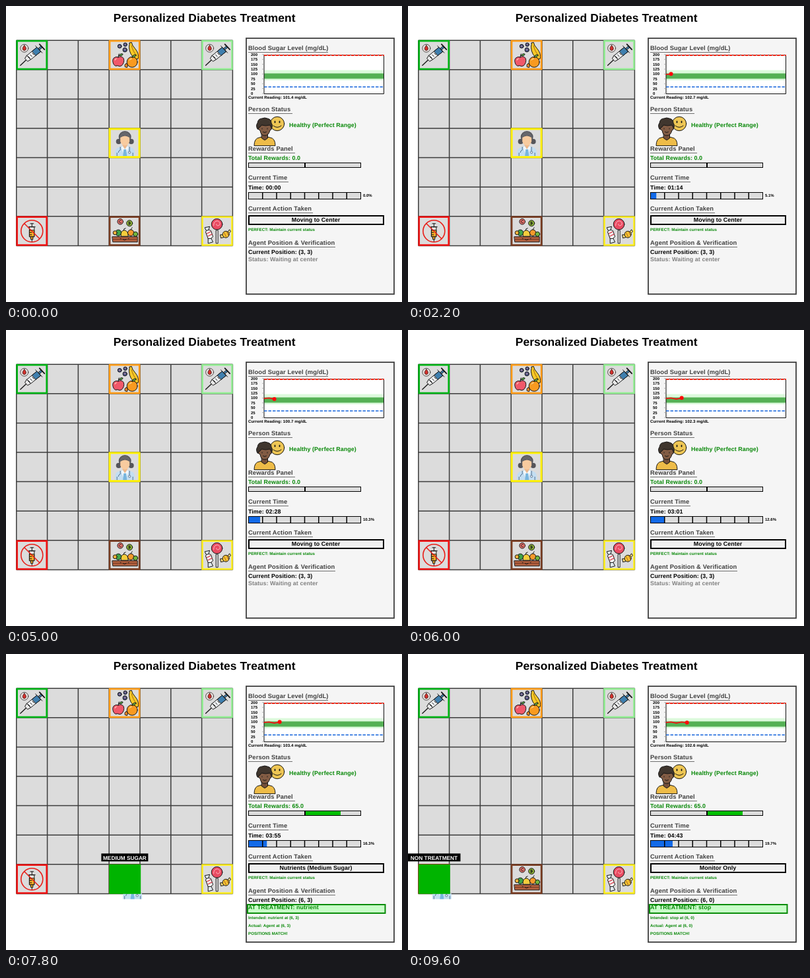
An HTML page that plays this animation: 600 px wide and 450 px high, repeating every 9800 ms.

```html
<!DOCTYPE html>
<html lang="en">
<head>
<meta charset="utf-8">
<title>Personalized Diabetes Treatment</title>
<style>
html, body { margin: 0; width: 100%; height: 100%; overflow: hidden; background: #fff; }
svg { display: block; width: 600px; height: 450px; }
text { font: bold 8.9px "Liberation Sans", Arial, sans-serif; letter-spacing: .07px; white-space: pre; text-rendering: geometricPrecision; }
.title { font-size: 17.4px; letter-spacing: .11px; }
.head { font-size: 9.3px; letter-spacing: .13px; fill: #404040; }
.small { font-size: 6.2px; letter-spacing: .03px; }
.tick { font-size: 6px; letter-spacing: 0; }
.mid { text-anchor: middle; }
.good { fill: #088808; }
.move { fill: #0a64e6; }
.ink { stroke: #161616; stroke-width: 1; stroke-linejoin: round; stroke-linecap: round; }
.none { fill: none; }
</style>
</head>
<body>
<svg viewBox="0 0 600 450">
  <defs>
    <g id="syringe" class="ink">
      <path class="none" d="M6 38L15 29.500" stroke-width="1.300"/>
      <path fill="#e8e8e8" d="M13 28l4 4 5-3-6-6z"/>
      <path fill="#f2f4f6" d="M16 23L31 10.500l6 6.500-15 12z"/>
      <path fill="#3f7fae" d="M24 16.500l7-6 6 6.500-7.500 6z"/>
      <path class="none" d="M18 24.500l2.500 2.500M21 22l2.500 2.500M24 19.500l2.500 2.500M29 8.500l10 10.500"/>
      <path fill="#3f7fae" d="M33.500 12l4-3.500 2 2-4 3.500z"/>
      <path class="none" d="M35 6l7.500 8" stroke-width="1.800"/>
      <circle cx="12" cy="12" r="6" fill="#eadfdd" stroke-width=".7"/>
      <path fill="#d5302c" stroke-width=".7" d="M12 7.500q4 4.500 2 7-2 2-4 0-2-2.500 2-7z"/>
    </g>
    <g id="fruit" class="ink">
      <path fill="#f7c927" d="M31 4l3-1q1 5 5 9 7 8 5 16-3 2-7-2Q28 17 31 4z"/>
      <path class="none" stroke="#a66a10" d="M34 8q2 9 8 16"/>
      <g fill="#51598b"><circle cx="16" cy="9" r="2.900"/><circle cx="24.500" cy="6.500" r="2.700"/><circle cx="24" cy="14.500" r="3.200"/></g>
      <path fill="none" stroke="#d99a9a" stroke-width=".9" d="M15 9h2M24 6h1M23 14h2"/>
      <path fill="#f0586a" d="M14 25.500q5-2.500 8 2 2 6-3 11-3 2-6 0-4 2-6-2-3-6 0-9.500 3-3 7-1.500z"/>
      <path class="none" d="M14 25.500q0-4 1-5"/>
      <path fill="#55ad43" d="M15 23q3-4 6-2-2 4-6 2z"/>
      <circle cx="35" cy="33" r="8" fill="#f99a20"/>
      <path fill="#6db43d" d="M35 26q1-5 6-4-1 4-6 4z"/>
      <path class="none" stroke="#fff0d0" d="M31 30q1-2 3-2M9 30q0-2 2-2"/>
      <path fill="#f48c2a" d="M24 40q-1-4 2.500-5 3 3 1 6z"/>
    </g>
    <g id="basket" class="ink">
      <circle cx="17" cy="8" r="4.300" fill="#ef7770"/><circle cx="31" cy="10.500" r="4.500" fill="#8fb43a"/>
      <path class="none" d="M18.500 6.500q-3-1.500-3.200 1.500.2 3 3.200 1.500M30 8.500v4M30 8.500q4 0 1 2 4 0-1 2"/>
      <circle cx="14" cy="25" r="4.600" fill="#3fa34a"/><circle cx="9" cy="25" r="3" fill="#f3b43b"/>
      <path fill="#f5cd3c" d="M18 30q-1-8 5-9 6 1 6 9z"/>
      <circle cx="33" cy="25" r="4.700" fill="#f59a2c"/><circle cx="40" cy="27" r="3.500" fill="#73b73e"/>
      <path class="none" d="M22 21q0-3 3-3M33 20l2-3"/>
      <path fill="#b4613f" d="M5 31h38v8H6z"/>
      <path class="none" stroke="#6b321f" d="M6 35h36"/>
      <path class="none" d="M21 35q2 2.500 5 0M17 34h1M29 34h1"/>
    </g>
    <g id="sweets" class="ink">
      <path fill="#f4f4f4" d="M22 21h2.500v20H22z"/>
      <circle cx="23" cy="12" r="8.300" fill="#e94b62"/>
      <path class="none" stroke="#ffb8c0" d="M18 14q0-7 6-7 5 2 3 6-4 3-5-1"/>
      <path fill="#dfe8ee" d="M5 17l7-1.500-2 6h-3z"/>
      <path fill="#dfe8ee" d="M10 33h4l3 6-7 2z"/>
      <path fill="#f4f4f4" d="M6 23q4-4 8-1l3 9q-3 4-7 3z"/>
      <path class="none" stroke="#d84856" stroke-width="1.500" d="M8 26l5-2.500M9.500 30l6-3"/>
      <path fill="#f7dc80" d="M32 28l-4 0 1 5 4-1zM40 23l2-3 2 3-3 3z"/>
      <circle cx="36.500" cy="27.500" r="5" fill="#f8c630"/>
      <path class="none" stroke="#a85a28" d="M34 25l3 6M38 23.500l2 5"/>
    </g>
    <g id="ban">
      <g class="ink" stroke-width=".9">
        <path fill="#f4f0e8" d="M20 16h7v15h-7z"/>
        <path fill="#f4ad28" d="M20 21h7v10h-7z"/>
        <path fill="#f4ad28" d="M22 31h3v4h-3z"/>
        <path class="none" d="M23.500 35v4M23.500 16v-5M21 11h5M18.500 16h10M20 21h3M20 24.500h3M20 28h3"/>
      </g>
      <circle cx="23.500" cy="22.500" r="16.500" fill="none" stroke="#e8201a" stroke-width="1.600"/>
      <path d="M12 11l23.500 23.500" stroke="#e8201a" stroke-width="1.600"/>
    </g>
    <g id="doctor">
      <circle cx="14.500" cy="20" r="4" fill="#55555a"/><circle cx="33.500" cy="20" r="4" fill="#55555a"/>
      <ellipse cx="24" cy="13" rx="9.500" ry="9" fill="#55555a"/>
      <path fill="#efb98c" d="M20.500 22h7v7l-3.500 3-3.500-3z"/>
      <path fill="#f8cb9f" d="M17 14q7-5 14 0v6q-2 6-7 6t-7-6z"/>
      <path fill="#66666b" d="M16 15q0-9 8-10 8 1 8 10-3-4-8-4t-8 4z"/>
      <path fill="#c3def2" d="M9 42q-1-11 5-13l7-2 3 5 3-5 7 2q6 2 5 13z"/>
      <path fill="#f4f8fb" d="M20.500 27l3.500 5 3.500-5 2 2-3.500 10h-4l-3.500-10z"/>
      <path fill="#79b6de" d="M22 32h4l1 10h-6z"/>
      <path fill="none" stroke="#56718e" d="M17 28v5q-3 1-3 4M31 28v7M12 42v-5M36 42v-5"/>
      <circle cx="31" cy="36.500" r="1.600" fill="#fff" stroke="#56718e"/>
    </g>
    <clipPath id="below"><path d="M21 44.500h29v8.500H21z"/></clipPath>
  </defs>
  <rect width="600" height="450" fill="#fff"/>
  <text class="title mid" x="300.700" y="24">Personalized Diabetes Treatment</text>
  <g id="board"></g>
  <g id="agent">
    <use href="#doctor"/>
    <rect x=".9" y=".9" width="45" height="42.800" fill="none" stroke="#fff200" stroke-width="3"/>
  </g>
  <g id="treat">
    <g clip-path="url(#below)"><rect x="21" y="44" width="29" height="9" fill="#e8edf2"/><use href="#doctor" x="11.500" y="11"/></g>
    <rect width="48" height="45" fill="#00b400"/>
    <rect id="tagBox" y="-16.500" height="12" fill="#000"/>
    <text id="tag" class="mid" x="23.700" y="-7.300" fill="#fff" style="font-size:8.3px;letter-spacing:0"></text>
  </g>
  <rect x="364" y="49" width="224" height="389" fill="#f5f5f5" stroke="#404040" stroke-width="1.800"/>
  <g id="heads"></g>
  <g id="chart">
    <rect x="391" y="74.500" width="182" height="59" fill="#fff"/>
    <rect x="391" y="97.500" width="182" height="15.500" fill="#dcfadc"/>
    <rect x="391" y="102.500" width="182" height="8" fill="#55b055"/>
    <path d="M391 74v59.500h181.500V74" fill="none" stroke="#111"/>
    <path d="M391 74.500h182" stroke="#502020"/>
    <path d="M391 75h182" stroke="#f02818" stroke-width="2" stroke-dasharray="4.500 1.500"/>
    <path d="M391 123h182" stroke="#1464dc" stroke-width="1.700" stroke-dasharray="4.500 2"/>
    <polyline id="trace" fill="none" stroke="#f01414" stroke-width="1.800"/>
    <circle id="dot" r="3" fill="#ff0a0a"/>
  </g>
  <text id="reading" class="small" x="367" y="141"></text>
  <g class="ink">
    <circle cx="411" cy="179" r="10.700" fill="#eec654"/>
    <path class="none" d="M405 182q6 5 12 0"/>
    <path class="none" stroke-width="1.800" d="M407.500 175.500v1.500M414.500 175.500v1.500"/>
    <path fill="#eebc48" d="M376 212q0-11 8-12l8-2 8 2q8 1 8 12z"/>
    <path fill="#75503a" d="M387.500 194h9v7l-4.500 3-4.500-3z"/>
    <path fill="#40362e" d="M381 187q-3-5 0-9 1-7 7-7 4-2 8 0 6 1 6 7 3 4 0 9z"/>
    <path fill="#825c44" d="M383 185q3-1 4-4 6 2 13 0l2 4q1 3-2 4-2 8-8 8t-7-8q-4-1-2-4z"/>
    <path class="none" d="M389.500 191.500q2.500 2 5 0M388 186v1M396 186v1"/>
  </g>
  <text class="good" x="429" y="183.500">Healthy (Perfect Range)</text>
  <text id="reward" class="good" x="367" y="234"></text>
  <rect x="367.500" y="238.500" width="170" height="7" fill="#dcdcdc"/>
  <rect id="gain" x="453" y="238.500" width="54" height="7" fill="#00be00"/>
  <rect x="367.500" y="238.500" width="170" height="7" fill="none" stroke="#000"/>
  <path d="M453 238v8" stroke="#000" stroke-width="2"/>
  <text id="clock" x="367" y="278.500"></text>
  <rect x="367.500" y="283.500" width="170" height="10" fill="#dcdcdc"/>
  <rect id="day" x="367.500" y="283.500" height="10" fill="#126ae8"/>
  <rect x="367.500" y="283.500" width="170" height="10" fill="none" stroke="#000"/>
  <g id="marks" stroke="#000" stroke-width="1.500"></g>
  <text id="share" class="tick" x="541" y="290"></text>
  <rect x="368" y="319" width="204" height="13" fill="#f0f0f0" stroke="#000" stroke-width="2"/>
  <text id="action" class="mid" x="469.500" y="328.300"></text>
  <text class="small good" x="367" y="342">PERFECT: Maintain current status</text>
  <text id="place" x="367" y="377"></text>
  <rect id="arrived" x="366" y="381" width="208.500" height="13" fill="#c8ffc8" stroke="#0a8c0a" stroke-width="2"/>
  <text id="status" x="367" y="388.300"></text>
  <g id="notes"></g>
</svg>
<script>
const $ = id => document.getElementById(id);
const NS = 'http://www.w3.org/2000/svg';
const STEP = 200, LOOP = 9800, MOVE_START = 31, CELL_STEPS = 3;
const CELL_W = 46.8, CELL_H = 44.6, LEFT = 15.8, TOP = 52.2;

function add(parent, tag, attrs, text = '') {
  const el = document.createElementNS(NS, tag);
  for (const key in attrs) el.setAttribute(key, attrs[key]);
  el.textContent = text;
  return $(parent).appendChild(el);
}
const at = (row, col) => `translate(${LEFT + col * CELL_W} ${TOP + row * CELL_H})`;
const show = (id, on) => $(id).setAttribute('visibility', on ? 'visible' : 'hidden');
const write = (id, text) => { $(id).textContent = text; };

// Board
add('board', 'rect', { x: LEFT, y: TOP, width: CELL_W * 7, height: CELL_H * 7, fill: '#dcdcdc' });
for (let n = 0; n < 8; n++) {
  const x = LEFT + n * CELL_W, y = TOP + n * CELL_H;
  add('board', 'path', { d: `M${x} ${TOP}v${CELL_H * 7}M${LEFT} ${y}h${CELL_W * 7}`, stroke: '#3c3c3c', 'stroke-width': 1.5 });
}
for (const [icon, row, col, color] of [
  ['syringe', 0, 0, '#00b414'], ['fruit', 0, 3, '#ff9c14'], ['syringe', 0, 6, '#90ee90'],
  ['ban', 6, 0, '#f01414'], ['basket', 6, 3, '#7a3d22'], ['sweets', 6, 6, '#fff01e']
]) {
  add('board', 'use', { href: '#' + icon, transform: at(row, col) });
  add('board', 'rect', { x: .9, y: .9, width: 45, height: 42.8, fill: 'none', stroke: color, 'stroke-width': 2.6, transform: at(row, col) });
}

// Panel
for (const [label, y, width] of [
  ['Blood Sugar Level (mg/dL)', 67, 121], ['Person Status', 160, 67], ['Rewards Panel', 220, 71],
  ['Current Time', 264, 61], ['Current Action Taken', 311, 98], ['Agent Position & Verification', 363, 132]
]) {
  add('heads', 'text', { class: 'head', x: 367, y }, label);
  add('heads', 'path', { d: `M367 ${y + 3.5}h${width}`, stroke: '#707070' });
}
for (let n = 0; n <= 8; n++) {
  const y = 133 - n * 7.4;
  add('chart', 'text', { class: 'tick', x: 371, y: y + 2 }, n * 25);
  add('chart', 'path', { d: `M388 ${y}h3`, stroke: '#999', 'stroke-width': .7 });
}
for (let n = 1; n < 8; n++) add('marks', 'path', { d: `M${367.5 + n * 21.25} 283.500v10` });
const notes = [400, 412, 427].map(y => add('notes', 'text', { class: 'small', x: 367, y }));

// [step, minutes, reading]
const LOG = [[0, 0, 101.4], [11, 74.1, 102.7], [25, 148.2, 100.7], [34, 208.4, 102.7],
  [39, 235.2, 103.4], [45, 267.5, 100.5], [48, 283.4, 102.6]];
const TRACE = [104.2, 103.3, 105, 103.3, 104.3];
const PATH = [[3, 3], [4, 3], [5, 3], [6, 3], [6, 2], [6, 1], [6, 0]];
const STOPS = {
  3: { name: 'nutrient', tag: 'MEDIUM SUGAR', width: 71, action: 'Nutrients (Medium Sugar)' },
  6: { name: 'stop', tag: 'NON TREATMENT', width: 80, action: 'Monitor Only' }
};

function sample(step) {
  let k = 1;
  while (k < LOG.length - 1 && step > LOG[k][0]) k++;
  const [s0, m0, r0] = LOG[k - 1], [s1, m1, r1] = LOG[k];
  const u = (step - s0) / (s1 - s0);
  return {
    minutes: m0 + (m1 - m0) * u,
    reading: r0 + (r1 - r0) * u + .7 * Math.sin(u * Math.PI * 4)
  };
}

function drawChart(hour, reading) {
  const points = TRACE.slice(0, hour + 1).map((y, n) => [390.5 + n * 8.05, y]);
  $('trace').setAttribute('points', hour ? points.join(' ') : '');
  show('dot', hour > 0);
  $('dot').setAttribute('cx', points[hour][0]);
  $('dot').setAttribute('cy', points[hour][1]);
  write('reading', `Current Reading: ${reading.toFixed(1)} mg/dL`);
}

function drawClock(minutes) {
  const two = n => String(Math.floor(n)).padStart(2, '0');
  write('clock', `Time: ${two(minutes / 60)}:${two(minutes % 60)}`);
  write('share', (minutes / 14.4).toFixed(1) + '%');
  $('day').setAttribute('width', 170 * minutes / 1440);
}

function drawAgent(step) {
  const moving = step >= MOVE_START;
  const leg = moving ? 1 + Math.floor((step - MOVE_START) / CELL_STEPS) : 0;
  const [row, col] = PATH[leg], stop = STOPS[leg];
  show('agent', !stop);
  show('treat', stop);
  show('arrived', stop);
  $('agent').setAttribute('transform', at(row, col));
  $('treat').setAttribute('transform', at(row, col));
  write('place', `Current Position: (${row}, ${col})`);
  write('action', stop ? stop.action : 'Moving to Center');
  write('reward', `Total Rewards: ${moving ? '65.0' : '0.0'}`);
  show('gain', moving);

  let status = 'Status: Waiting at center', lines = [];
  if (stop) {
    const spot = `at (${row}, ${col})`;
    status = 'AT TREATMENT: ' + stop.name;
    lines = [[`Intended: ${stop.name} ${spot}`, 402.5], [`Actual: Agent ${spot}`, 414.5], ['POSITIONS MATCH!', 427]];
    write('tag', stop.tag);
    $('tagBox').setAttribute('x', 23.7 - stop.width / 2);
    $('tagBox').setAttribute('width', stop.width);
  } else if (moving) {
    status = 'Moving to: (6, 0)';
    lines = [['Target treatment: stop', 400], [`Movement progress: ${Math.round(leg / 6 * 100)}%`, 412]];
  }
  const tone = stop ? 'good' : 'move';
  write('status', status);
  $('status').setAttribute('class', moving ? tone : '');
  $('status').setAttribute('fill', '#808080');
  notes.forEach((note, n) => {
    const [line, y] = lines[n] || ['', 0];
    note.textContent = line;
    note.setAttribute('y', y);
    note.setAttribute('class', 'small ' + tone);
  });
}

let last = -1;
const start = performance.now();
function tick() {
  const step = Math.floor((performance.now() - start) % LOOP / STEP);
  if (step !== last) {
    const { minutes, reading } = sample(step);
    drawChart(Math.floor(minutes / 60), reading);
    drawClock(minutes);
    drawAgent(step);
    last = step;
  }
  requestAnimationFrame(tick);
}
tick();
</script>
</body>
</html>
```
